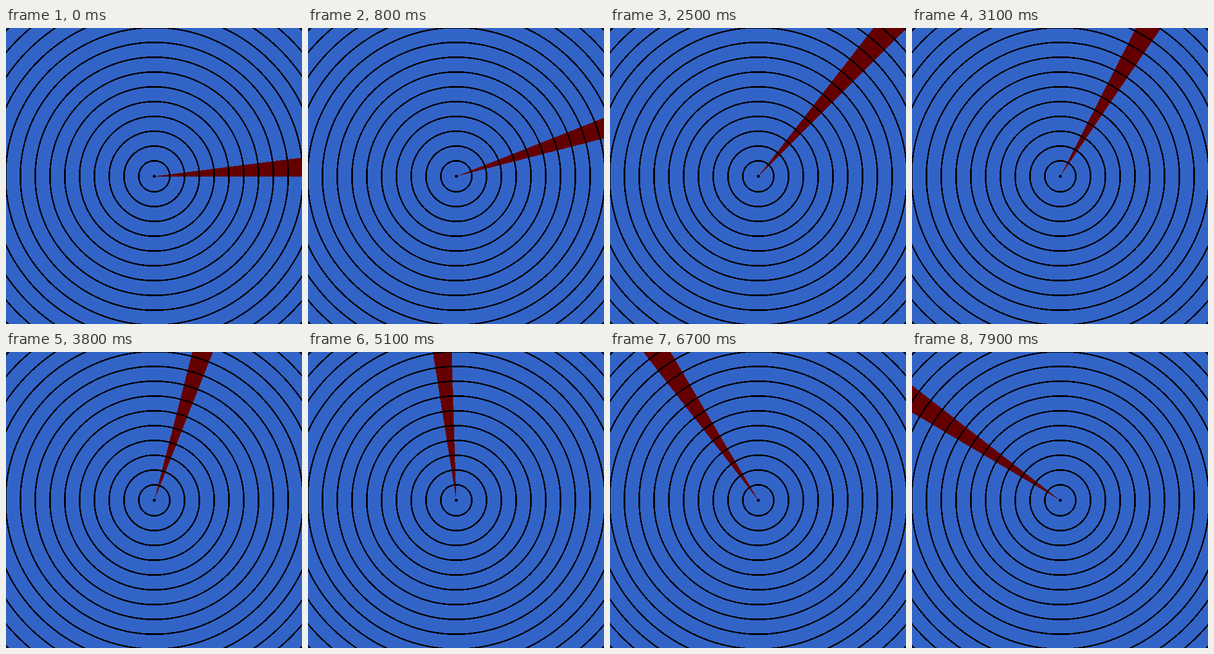
An HTML page with a canvas for the animation above (8 s loop, 500 px wide and 500 px high).

```html
<!DOCTYPE html>
<html lang="en">
<head>
<meta charset="utf-8">
<title>Radar sweep</title>
<style>
  html, body { margin: 0; width: 100%; height: 100%; overflow: hidden; background: #3264c8; }
  canvas { position: absolute; left: 0; top: 0; }
</style>
</head>
<body>
<canvas id="beam" width="500" height="500"></canvas>
<canvas id="rings" width="500" height="500"></canvas>
<script>
const SIZE = 500, MID = 250, GAP = 25, LINE = 2.5;
const LOOP = 8000, STEP = 100, TURN = 1.8, SPREAD = 4 * TURN;
const context = id => document.getElementById(id).getContext('2d');
const beam = context('beam'), rings = context('rings');

// Hard-edged rings and centre dot, plotted once per pixel.
function drawRings() {
  for (let y = 0; y < SIZE; y++) {
    for (let x = 0; x < SIZE; x++) {
      if (Math.hypot(x - MID, y - MID) % GAP < LINE) rings.fillRect(x, y, 1, 1);
    }
  }
}

// Where a ray at the given angle crosses a row dy above the centre.
function crossing(dy, degrees) {
  if (degrees === 0) return SIZE;
  const x = MID + dy / Math.tan(degrees * Math.PI / 180);
  return Math.max(-1, Math.min(SIZE, x));
}

function drawBeam(angle) {
  beam.clearRect(0, 0, SIZE, SIZE);
  beam.fillStyle = '#640000';
  for (let dy = 0; dy <= MID; dy++) {
    const left = Math.ceil(crossing(dy, angle + SPREAD));
    const right = Math.floor(crossing(dy, angle));
    beam.fillRect(left, MID - dy, right - left + 1, 1);
  }
}

function frame() {
  const step = Math.floor(performance.now() % LOOP / STEP);
  drawBeam(step * TURN);
  requestAnimationFrame(frame);
}

drawRings();
frame();
</script>
</body>
</html>
```
